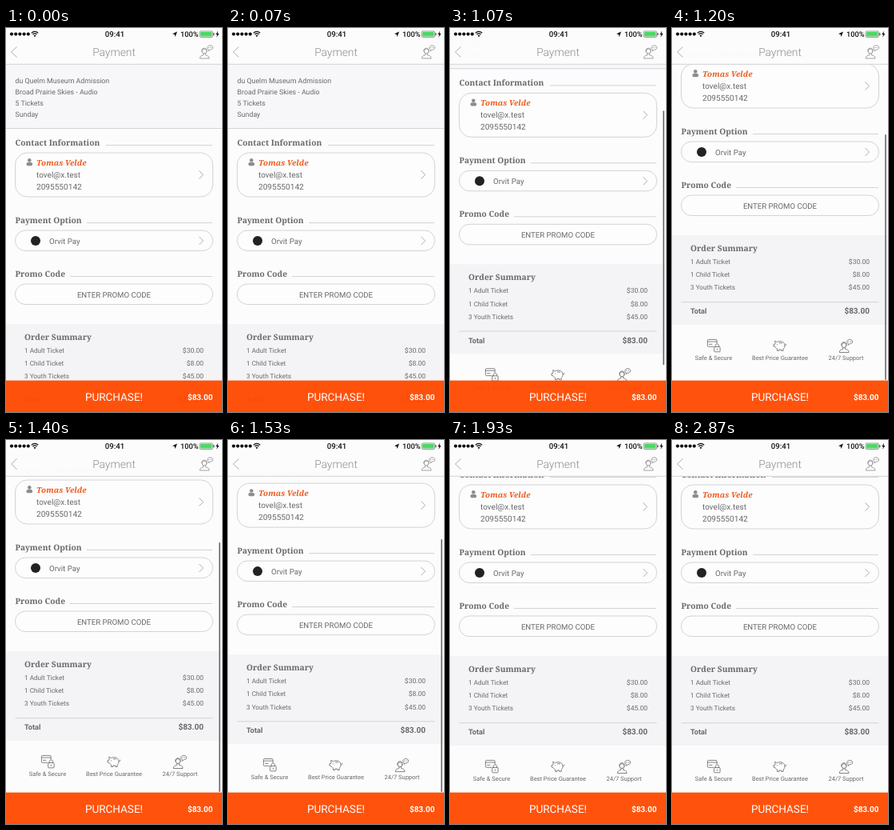
An HTML page that plays this animation: 270 by 480 pixels, repeating every 3.07 s.

```html
<!DOCTYPE html>
<html lang="en">
<head>
<meta charset="utf-8">
<title>Payment</title>
<style>
  html, body { margin: 0; width: 100%; height: 100%; overflow: hidden; background: #fcfcfd; }
  svg { display: block; width: 100%; height: 100%; }
  text { font-family: Roboto, "Open Sans", sans-serif; fill: #69686c; text-rendering: geometricPrecision; }
  .serif { font: 600 10.2px "Noto Serif", serif; fill: #69686c; }
  .name { font: italic 700 9.8px "Noto Serif", serif; fill: #f05a1a; }
  .light { font-weight: 300; }
  .bold { font-weight: 700; }
  .status { font-weight: 500; fill: #111; }
  .white { fill: #fff; }
  .end { text-anchor: end; }
  .mid { text-anchor: middle; }
  .line { fill: none; stroke: #d3d2d6; stroke-width: 1; }
  .arrow { fill: none; stroke: #aeadb1; stroke-width: 1; }
  .icon { fill: none; stroke: #66656a; stroke-width: .8; stroke-linejoin: round; stroke-linecap: round; }
</style>
</head>
<body>
<svg id="stage" viewBox="0 0 270 480" preserveAspectRatio="none"></svg>
<script>
const LOOP = 3070, FRAME = 1000 / 15;
const MAX_SCROLL = 100, DRAG_START = 14, SPRING_START = 18;

const text = (x, y, size, label, cls = '', extra = '') =>
  `<text x="${x}" y="${y}" font-size="${size}" class="${cls}" ${extra}>${label}</text>`;
const rect = (x, y, w, h, fill, extra = '') =>
  `<rect x="${x}" y="${y}" width="${w}" height="${h}" fill="${fill}" ${extra}/>`;
const path = (d, cls, extra = '') => `<path d="${d}" class="${cls}" ${extra}/>`;
const circle = (x, y, r, fill) => `<circle cx="${x}" cy="${y}" r="${r}" fill="${fill}"/>`;

const heading = (y, label, lineX) =>
  `<text x="11.5" y="${y}" class="serif">${label}</text>` +
  path(`M${lineX} ${y - .5}H258`, 'line');
const pill = (y, h, r) => rect(11.5, y, 247, h, '#fdfdfe', `rx="${r}" stroke="#d3d2d6"`);
const chevron = y => path(`M241.5 ${y - 5}l5 5l-5 5`, 'arrow');
const priceRow = (y, label, price) =>
  text(23, y, 8.2, label) + text(247, y, 8.5, price, 'end');

// Agent with a speech bubble, drawn in a box of about 17 by 17.
const agent = (x, y, color) => `<g transform="translate(${x} ${y})" class="icon" style="stroke:${color}">
  <circle cx="6" cy="8" r="3"/>
  <path d="M2.700 8C2 3.500 8 2.800 9 6.200M4.800 11v1.800C2 13.400 .4 14.200 .3 17H12c0-2.800-1.800-3.600-4.600-4.200V11"/>
  <path d="M10.200 5.600C8.600 2.400 11 .8 13 .8c4.800 0 4.800 5.400 .4 5.400l-2.400 1.600l.2-1.700"/>
  <path d="M11.500 3.500h.1m1.600 0h.1m1.600 0h.1"/></g>`;

const cardLock = (x, y) => `<g transform="translate(${x} ${y})" class="icon">
  <path d="M8 9.300H1.500Q.4 9.300 .4 8.200V1.500Q.4 .4 1.500 .4H11Q12.100 .4 12.100 1.500V5M.4 3H12.100M2.500 6.300H6"/>
  <rect x="8.700" y="9.500" width="7.400" height="6.300" rx=".8"/>
  <path d="M10.200 9.500V8c0-2.800 4.400-2.800 4.400 0v1.500M12.400 12v1.300"/></g>`;

const piggy = (x, y) => `<g transform="translate(${x} ${y})" class="icon">
  <path d="M2.500 5.500L2.200 2.200L5 3.600C8 1.800 14 2.400 14.600 7.500C14.600 10 13.500 11.300 12.600 12v2.400h-2.400V13H7.300v1.400H5V12C3.600 11.200 2.600 10.300 2.300 9.400L.5 9V6.500L1.700 6.300Z"/>
  <path d="M14.500 7.500c1.500 .3 2-.6 1.800-1.400M4.800 6.600h.1M7.800 4.700Q9.500 4.200 11 4.900"/></g>`;

const content =
  rect(0, -80, 270, 205.5, '#f7f7f9') + path('M0 125.500H270', 'line') +
  ['du Quelm Museum Admission', 'Broad Prairie Skies - Audio', '5 Tickets', 'Sunday']
    .map((label, i) => text(11.5, 68.5 + i * 14.2, 8.8, label)).join('') +

  heading(147, 'Contact Information', 125) + pill(156, 55, 15) +
  circle(29.3, 165.4, 2.3, '#8d8c90') +
  rect(25.5, 168, 7.6, 4.2, '#8d8c90', 'rx="1.7"') +
  '<text x="38" y="172" class="name">Tomas Velde</text>' +
  text(38, 186.7, 10, 'tovel@x.test') + text(38, 202, 10.1, '2095550142') + chevron(183.5) +

  heading(244, 'Payment Option', 101) + pill(253, 25.5, 12.7) +
  circle(37, 266, 6, '#222') + text(54, 270, 9.7, 'Orvit Pay') + chevron(266) +

  heading(311, 'Promo Code', 80) + pill(320, 25.5, 12.7) +
  text(135, 337, 9.6, 'ENTER PROMO CODE', 'mid') +

  rect(0, 370, 270, 112, '#f4f4f6') +
  '<text x="23" y="390" class="serif">Order Summary</text>' +
  priceRow(406, '1 Adult Ticket', '$30.00') +
  priceRow(422.3, '1 Child Ticket', '$8.00') +
  priceRow(438.4, '3 Youth Tickets', '$45.00') +
  path('M11.500 453.700H258.500', 'line') +
  text(23, 468.3, 9.2, 'Total', 'bold') + text(247, 468.3, 10, '$83.00', 'bold end') +

  cardLock(44, 500) + piggy(126.5, 500) + agent(209, 499.5, '#66656a') +
  text(52, 526.3, 7.5, 'Safe &amp; Secure', 'mid') +
  text(135, 525.8, 7.5, 'Best Price Guarantee', 'mid') +
  text(217.5, 526.3, 7.5, '24/7 Support', 'mid');

const header =
  rect(0, 0, 270, 45.5, '#fcfcfd', 'opacity=".985"') + path('M0 45.300H270', 'line') +
  [0, 1, 2, 3, 4].map(i => circle(7 + i * 5.2, 7.6, 2.1, '#111')).join('') +
  path('M31.800 6.200Q36 2.400 40.200 6.200M33.400 8Q36 5.800 38.600 8', '', 'fill="none" stroke="#111" stroke-width="1.200"') +
  path('M36 11.200L34.500 9.500Q36 8.200 37.500 9.500Z', '', 'fill="#111"') +
  text(136, 11, 9.6, '09:41', 'status mid') +
  path('M214 4.500L211.500 11L210.700 8L208 7.300Z', '', 'fill="#111"') +
  text(218, 11, 9.2, '100%', 'status') +
  rect(242, 4, 16.5, 7.5, '#fff', 'rx="1.500" stroke="#555" stroke-width=".6"') +
  rect(243, 5, 14.5, 5.5, '#4cd964', 'rx=".7"') + rect(259.2, 6.2, 1.2, 3, '#555') +
  path('M265 3.800L262.200 8.300H264L263.300 11.800L266.400 7H264.600Z', '', 'fill="#111"') +
  path('M13.500 23.500L6.500 30L13.500 36.500', 'arrow') +
  text(135, 35, 13.8, 'Payment', 'light mid', 'style="fill:#8d8c91"') +
  agent(242, 21, '#8b8a8f');

const purchaseBar =
  rect(0, 440.6, 270, 39.4, '#ff4b02', 'opacity=".955"') +
  text(135, 466, 13.5, 'PURCHASE!', 'white mid') +
  text(258.5, 465, 10, '$83.00', 'bold white end');

document.getElementById('stage').innerHTML =
  rect(0, 0, 270, 480, '#fcfcfd') + `<g id="content">${content}</g>` +
  rect(266, 48, 2, 318, '#858489', 'id="thumb" rx="1"') + header + purchaseBar;

const contentGroup = document.getElementById('content');
const thumb = document.getElementById('thumb');
const clamp = (v, lo, hi) => Math.min(hi, Math.max(lo, v));

// A flick past the end, then a damped spring back to the scroll limit.
function scrollAt(step) {
  if (step < DRAG_START) return 0;
  if (step < SPRING_START) return 11 + 103 * Math.sin((step - DRAG_START) / 3);
  const s = step - SPRING_START;
  return MAX_SCROLL + 11 * (1 + 1.67 * s) * Math.exp(-.8 * s);
}

function draw(time) {
  const step = Math.floor((time % LOOP + 5) / FRAME);
  const scroll = scrollAt(step);
  const over = Math.max(0, scroll - MAX_SCROLL);
  contentGroup.setAttribute('transform', `translate(0 ${-scroll.toFixed(2)})`);
  thumb.setAttribute('y', 48 + Math.min(scroll, MAX_SCROLL) * .74 + over);
  thumb.setAttribute('height', 318 - over);
  thumb.setAttribute('opacity', step < DRAG_START ? 0 : clamp((29 - step) / 3, 0, 1));
}

const start = performance.now();
function tick() {
  draw(performance.now() - start);
  requestAnimationFrame(tick);
}
draw(0);
requestAnimationFrame(tick);
</script>
</body>
</html>
```
